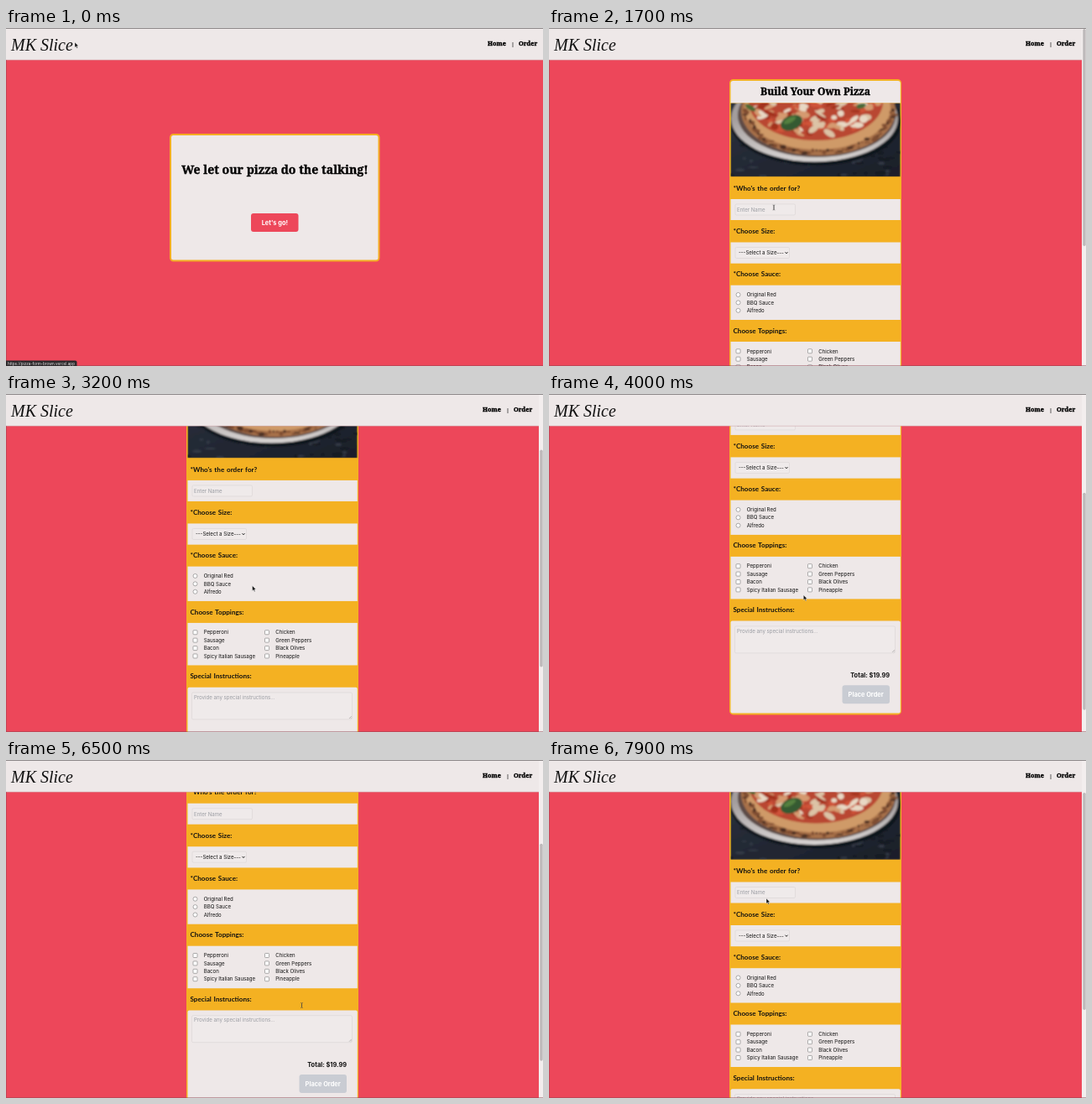
An HTML page for the animation above (8000 ms loop, 640 by 403 pixels).

```html
<!DOCTYPE html>
<html lang="en">
<head>
<meta charset="utf-8">
<title>Pizza order form</title>
<style>
html, body { margin: 0; width: 100%; height: 100%; overflow: hidden; background: #ed475a; }
svg { display: block; width: 100vw; height: 100vh; }
text { font-family: Inter, sans-serif; font-size: 6.1px; fill: #111; white-space: pre; }
.slab { font-family: "Noto Serif", serif; font-weight: 900; fill: #000; stroke: #000; stroke-width: .35; }
.label { font-family: Lato, sans-serif; font-size: 8.1px; font-weight: 700; word-spacing: .8px; }
.logo { font: italic 20px "Liberation Serif", serif; }
.strong { font-size: 7.4px; font-weight: 700; }
.hint { fill: #9b9da3; }
.mid { text-anchor: middle; }
.end { text-anchor: end; }
.white { fill: #fff; }
.box { fill: #efeaea; stroke: #d9d3d4; stroke-width: .6; }
.tick { fill: #fff; stroke: #777; stroke-width: .6; }
</style>
</head>
<body>
<svg viewBox="0 0 640 403" preserveAspectRatio="none">
  <defs>
    <clipPath id="photoClip"><path d="M216.500 89.500H418.800V177.200H216.500z"/></clipPath>
    <filter id="soft"><feGaussianBlur stdDeviation=".8"/></filter>
    <linearGradient id="plate" x2="0" y2="1">
      <stop offset=".5" stop-color="#a39d9d"/><stop offset="1" stop-color="#d8d4d3"/>
    </linearGradient>
    <linearGradient id="table" x2="1" y2="1">
      <stop stop-color="#2b323e"/><stop offset="1" stop-color="#1a1e29"/>
    </linearGradient>
  </defs>
  <rect width="640" height="403" fill="#ed475a"/>

  <g id="home">
    <rect x="196" y="127" width="248.500" height="150.500" rx="3.500" fill="#eee8e8" stroke="#f4ad22" stroke-width="2"/>
    <text class="slab mid" x="320.500" y="174.200" style="font-size:14.1px">We let our pizza do the talking!</text>
    <rect x="292" y="221" width="56.500" height="22" rx="3" fill="#ed475a"/>
    <text class="strong white mid" x="320.300" y="234.700">Let's go!</text>
  </g>

  <g id="order">
    <g id="form"></g>
    <rect x="635" y="0" width="5" height="403" fill="#f3eeee"/>
    <rect id="thumb" x="636.300" width="3.400" height="259" rx="1.700" fill="#bdb9ba"/>
  </g>

  <rect id="bar" width="640" height="38" fill="#eee8e8"/>
  <path d="M0 .5H640" stroke="#8d898a"/>
  <path id="edge" stroke="#cfa9ae" stroke-width=".6"/>
  <path d="M.2 38V402.700H640" fill="none" stroke="#8d4450" stroke-width=".6"/>
  <text class="logo" x="6" y="27">MK Slice</text>
  <g id="nav">
    <text class="slab" x="568" y="21.300" style="font-size:7.3px">Home</text>
    <path d="M598 17V23" stroke="#222" stroke-width=".7"/>
    <text class="slab" x="605" y="21.300" style="font-size:7.3px">Order</text>
  </g>

  <g id="status">
    <path d="M0 396.500H82.500Q84.500 396.500 84.500 398.500V403H0z" fill="#2d2a2c"/>
    <text x="2" y="401.600" style="font-size:4.65px;fill:#e4e0e1">https://pizza-form-brown.vercel.app</text>
  </g>
  <path id="arrow" d="M0 0V6.200L1.500 4.900L2.500 7.200L3.500 6.800L2.500 4.500H4.400z" fill="#111" stroke="#fff" stroke-width=".4"/>
  <path id="beam" d="M-1.300 -3Q0 -3 0 -2V2Q0 3 -1.300 3M1.300 -3Q0 -3 0 -2V2Q0 3 1.300 3" fill="none" stroke="#444" stroke-width=".6"/>
</svg>
<script>
const $ = id => document.getElementById(id);
const LOOP = 8000, MAX_SCROLL = 220, OPEN_AT = 1050;

const rect = (x, y, w, h, attrs) => `<rect x="${x}" y="${y}" width="${w}" height="${h}" ${attrs}/>`;
const oval = (x, y, rx, ry, fill, turn = 0) =>
  `<ellipse cx="${x}" cy="${y}" rx="${rx}" ry="${ry}" fill="${fill}" transform="rotate(${turn} ${x} ${y})"/>`;
const text = (s, x, y, cls = '') => `<text x="${x}" y="${y}" class="${cls}">${s}</text>`;

function photo() {
  let seed = 7;
  const rnd = () => (seed = seed * 16807 % 2147483647) / 2147483647;
  let s = rect(216, 89, 203, 89, 'fill="url(#table)"');
  for (let i = 0; i < 40; i++)
    s += oval(217 + rnd() * 202, 140 + rnd() * 38, 2 + rnd() * 5, 1 + rnd(), i % 2 ? '#343b47' : '#161a24');
  s += oval(318, 112, 102, 52, '#11141c') + oval(316.500, 108, 99.500, 51.500, 'url(#plate)')
    + oval(319, 104, 94, 50, '#5d4c47') + oval(321, 99, 92, 53, '#a87149')
    + oval(320, 95, 87, 50, '#cf9a68');
  // charred spots along the crust
  for (let i = 0; i < 60; i++) {
    const a = Math.PI * i / 59, d = .9 + rnd() * .09;
    s += oval(321 + 92 * d * Math.cos(a), 98 + 53 * d * Math.sin(a), 1 + rnd() * 3, .8 + rnd() * 1.800, i % 3 ? '#7f4d30' : '#4b2e22');
  }
  s += oval(318, 88, 80, 46, '#b94630');
  // cheese and sauce
  for (let i = 0; i < 90; i++) {
    const a = Math.PI * rnd(), d = Math.sqrt(rnd()) * .94;
    const fill = ['#dcc3a6', '#cf5238', '#e8d8c4', '#a3301f', '#d59a70'][i % 5];
    s += oval(318 + 79 * d * Math.cos(a), 88 + 44 * d * Math.sin(a), 3 + rnd() * 6, 1.500 + rnd() * 3, fill, rnd() * 80 - 40);
  }
  s += oval(289, 113, 13.500, 8.500, '#345a30', -22) + oval(287, 110, 8, 3, '#55803f', -28)
    + oval(240, 95, 7, 3, '#4b6a35', 30) + oval(372, 93, 6, 3, '#486b38', -15);
  return `<g clip-path="url(#photoClip)"><g filter="url(#soft)">${s}</g></g>`;
}

function form() {
  let s = rect(216, 62, 203, 499.500, 'rx="3.500" fill="#f4b122" stroke="#f4b122" stroke-width="2"')
    + `<path d="M216.500 89.500V66Q216.500 63 219.500 63H415.800Q418.800 63 418.800 66V89.500z" fill="#eee8e8"/>`
    + `<text class="slab mid" x="317.500" y="80.300" style="font-size:12.05px">Build Your Own Pizza</text>`
    + photo();
  const panels = [
    ["*Who's the order for?", 204, 229], ['*Choose Size:', 255.500, 280.700], ['*Choose Sauce:', 306.700, 348],
    ['Choose Toppings:', 374, 424.500], ['Special Instructions:', 450.700, 560.500]
  ];
  for (const [name, top, bottom] of panels)
    s += text(name, 219.500, top - 10.400, 'label')
      + rect(216.500, top, 202.300, bottom - top, `fill="#eee8e8" rx="${bottom > 500 ? 2 : 0}"`);

  s += rect(222, 210, 71.500, 13, 'rx="1.500" class="box"') + text('Enter Name', 224, 218.800, 'hint');
  s += rect(222, 261.500, 64.500, 13, 'rx="1.500" class="box"') + text('---Select a Size---', 226, 270.300)
    + '<path d="M281.500 267.200L283 268.900L284.500 267.200" fill="none" stroke="#111" stroke-width=".9"/>';

  ['Original Red', 'BBQ Sauce', 'Alfredo'].forEach((name, i) => {
    const y = 318 + 9.400 * i;
    s += `<circle cx="225.500" cy="${y}" r="2.500" class="tick"/>` + text(name, 235.700, y + 2.200);
  });
  ['Pepperoni', 'Sausage', 'Bacon', 'Spicy Italian Sausage', 'Chicken', 'Green Peppers', 'Black Olives', 'Pineapple']
    .forEach((name, i) => {
      const x = i < 4 ? 223 : 308.500, y = 385.300 + 9.400 * (i % 4);
      s += rect(x, y - 2.500, 5, 5, 'rx=".8" class="tick"') + text(name, x + 12.700, y + 2.200);
    });

  s += rect(221.500, 457, 191, 32, 'rx="1.500" class="box"')
    + text('Provide any special instructions...', 224, 464.700, 'hint')
    + '<path d="M409 488L411.800 485.200M410.700 488L411.800 486.900" stroke="#888" stroke-width=".5"/>'
    + text('Total: $19.99', 406, 518.200, 'strong end')
    + rect(349.500, 527.300, 56.500, 22, 'rx="3" fill="#c9ccd3"')
    + text('Place Order', 377.700, 541, 'strong white mid');
  return s;
}
$('form').innerHTML = form();

const SCROLL = [[1900, 0], [2200, 12], [2600, 52.500], [2700, 60], [3200, 101], [3600, 126], [4000, 180],
  [4400, 220], [6350, 220], [6500, 152.500], [6700, 110], [7000, 74], [7250, 61], [7900, 58.500]];
const POINTER = [[50, 82, 17], [850, 320, 231], [1150, 320, 231], [1650, 268, 214], [2400, 268, 214],
  [3100, 293.500, 228.500], [3800, 293.500, 228.500], [4700, 370.500, 316], [5500, 370.500, 316],
  [6300, 352.500, 292.500], [6600, 352.500, 292.500], [7300, 262, 170], [7800, 259, 165]];

// Value of a keyed track at time t
function track(keys, t, ease = u => u) {
  const n = keys.findIndex(k => k[0] > t);
  if (n < 1) return keys[n ? keys.length - 1 : 0].slice(1);
  const a = keys[n - 1], b = keys[n], u = ease((t - a[0]) / (b[0] - a[0]));
  return a.slice(1).map((v, i) => v + (b[i + 1] - v) * u);
}
const smooth = u => u * u * (3 - 2 * u);
const show = (id, on) => $(id).setAttribute('visibility', on ? 'visible' : 'hidden');
const move = (id, x, y) => $(id).setAttribute('transform', `translate(${x} ${y})`);

function draw(now) {
  const t = now % LOOP, open = t >= OPEN_AT, width = open ? 635 : 640;
  const [scroll] = track(SCROLL, t), [x, y] = track(POINTER, t, smooth);
  show('home', !open);
  show('order', open);
  show('status', t < 450);
  move('form', 0, -scroll);
  move('thumb', 0, 1 + scroll / MAX_SCROLL * 142.500);
  move('nav', open ? 0 : 6, 0);
  $('bar').setAttribute('width', width);
  $('edge').setAttribute('d', `M0 38.200H${width}`);

  const typing = t > 1550 && t < 2200 || t > 6200 && t < 6700;
  const hidden = t > 2350 && t < 2800;
  show('beam', typing);
  show('arrow', !typing && !hidden);
  move('beam', x, y);
  move('arrow', x, y);
  requestAnimationFrame(draw);
}
requestAnimationFrame(draw);
</script>
</body>
</html>
```
